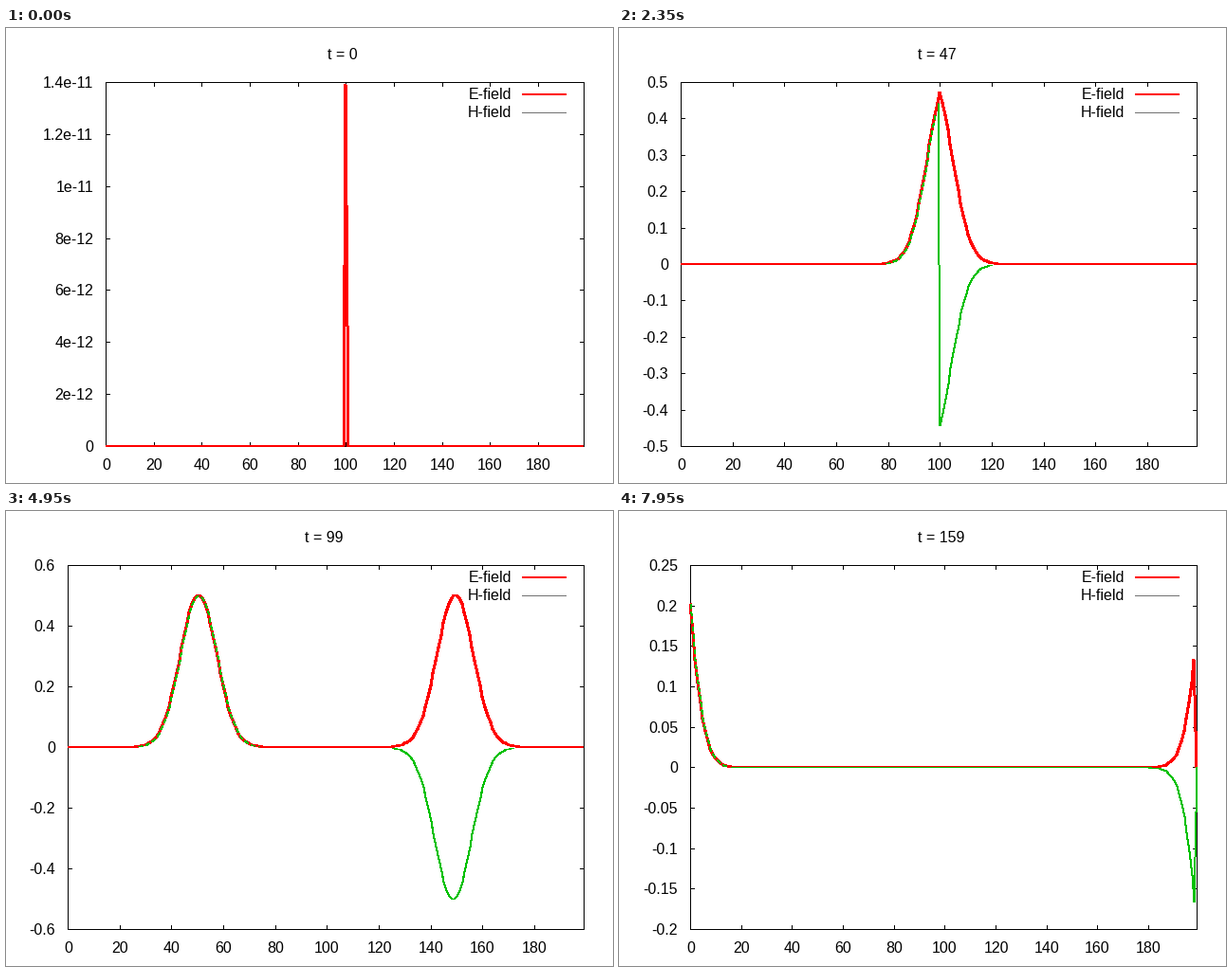
Recreate the animation shown at these times as a matplotlib script. Size 640 by 480 pixels, loop 8000 ms.

```python
import math

import matplotlib.pyplot as plt
import numpy as np
from matplotlib.animation import FuncAnimation

W, H, DPI = 640, 480, 100
PX = 72 / DPI
FRAMES, INTERVAL = 160, 50
SIZE, MID = 200, 100
RIGHT, TOP, BOTTOM = 609, 57, 441
RED, GREEN, KEY = "#ff0000", "#00c000", "#717171"

plt.rcParams["font.family"] = "Liberation Sans"
plt.rcParams["font.size"] = 16 * PX

fig = plt.figure(figsize=(W / DPI, H / DPI), dpi=DPI, facecolor="white")
ax = fig.add_axes([0, 0, 1, 1])

# Pulse leaving the middle node when the time step equals the cell size
pulse = np.zeros(FRAMES)
for n in range(FRAMES):
    pulse[n] = math.exp(-((n - 50) ** 2) / 100) - (pulse[n - 1] if n else 0)


def wave(age):
    return np.where(age >= 0, pulse[np.clip(age, 0, FRAMES - 1)], 0.0)


def fields(t):
    m = np.arange(SIZE)
    age = t - abs(m - MID)
    e = wave(age)
    h = np.where(m < MID, wave(age), -wave(age - 1))
    e[-1] = h[-1] = 0
    return e, h


def tic_step(span):
    """Tic distance that gives at most about twenty tics."""
    power = 10.0 ** math.floor(math.log10(span) + 1e-9)
    room = 20 / (span / power)
    for limit, step in ((10.0001, 0.2), (4, 0.5), (1, 1)):
        if room > limit:
            return step * power
    return 2 * power


def label(x, y, text, ha):
    ax.text(x, y, text, ha=ha, va="baseline", color="black")


def line(xs, ys, color, width=1, **kw):
    ax.plot(xs, ys, color=color, lw=width * PX, antialiased=False, snap=False,
            solid_capstyle="butt", solid_joinstyle="bevel",
            dash_capstyle="butt", **kw)


def segment(x0, y0, x1, y1):
    line([x0, x1], [y0, y1], "black")


def draw(t):
    ax.clear()
    ax.set_axis_off()
    ax.set_xlim(0, W)
    ax.set_ylim(H, 0)

    e, h = fields(t)
    lo, hi = min(e.min(), h.min()), max(e.max(), h.max())
    step = tic_step(float("%.6g" % (hi - lo)))
    first = math.floor(lo / step + 1e-6)
    last = math.ceil(hi / step - 1e-6)
    names = ["%g" % (k * step) for k in range(first, last + 1)]
    left = 25 + 10 * max(len(s.lstrip("-")) + 1 for s in names)

    def to_x(v):
        return np.floor(left + np.asarray(v) / (SIZE - 1) * (RIGHT - left) + 0.5)

    def to_y(v):
        part = (np.asarray(v) / step - first) / (last - first)
        return np.floor(BOTTOM - part * (BOTTOM - TOP) + 0.5)

    # Frame and tics
    for y in (TOP, BOTTOM):
        segment(left, y + 0.5, RIGHT + 1, y + 0.5)
    for x in (left, RIGHT):
        segment(x + 0.5, TOP, x + 0.5, BOTTOM + 1)
    for k, name in zip(range(first, last + 1), names):
        y = float(to_y(k * step))
        segment(left, y + 0.5, left + 5, y + 0.5)
        segment(RIGHT - 4, y + 0.5, RIGHT + 1, y + 0.5)
        label(left - 13, y + 6, name, "right")
    for v in range(0, SIZE, 20):
        x = float(to_x(v))
        segment(x + 0.5, TOP, x + 0.5, TOP + 5)
        segment(x + 0.5, BOTTOM - 4, x + 0.5, BOTTOM + 1)
        label(x + 0.5, 466, str(v), "center")

    label((left + RIGHT) / 2 - 2, 33, "t = %d" % t, "center")

    # Legend
    label(533.5, 75, "E-field", "right")
    label(533.5, 94, "H-field", "right")
    line([544, 591], [70, 70], RED, 2)
    line([544, 591], [89.5, 89.5], KEY)

    # Curves: the thin one runs as dashes where both coincide
    xs = to_x(np.arange(SIZE))
    ye, yh = to_y(e), to_y(h)
    zero = float(to_y(0))
    line(xs, ye, RED, 2)
    flat = yh == zero
    thin = yh + 0.5
    both = np.arange(SIZE) < MID - 1
    line(xs + 0.5, np.where(both & ~flat, thin, np.nan), GREEN,
         linestyle=(0, (5, 4)))
    hide = both & ~flat
    if zero % 2:
        hide = hide | (flat & (np.arange(SIZE) < SIZE - 1))
        if flat[-2]:
            hide[-1] = True
    line(xs + 0.5, np.where(hide, np.nan, thin), GREEN)
    return []


anim = FuncAnimation(fig, draw, frames=FRAMES, interval=INTERVAL,
                     init_func=lambda: [], repeat=True, repeat_delay=0)
plt.show()
```
